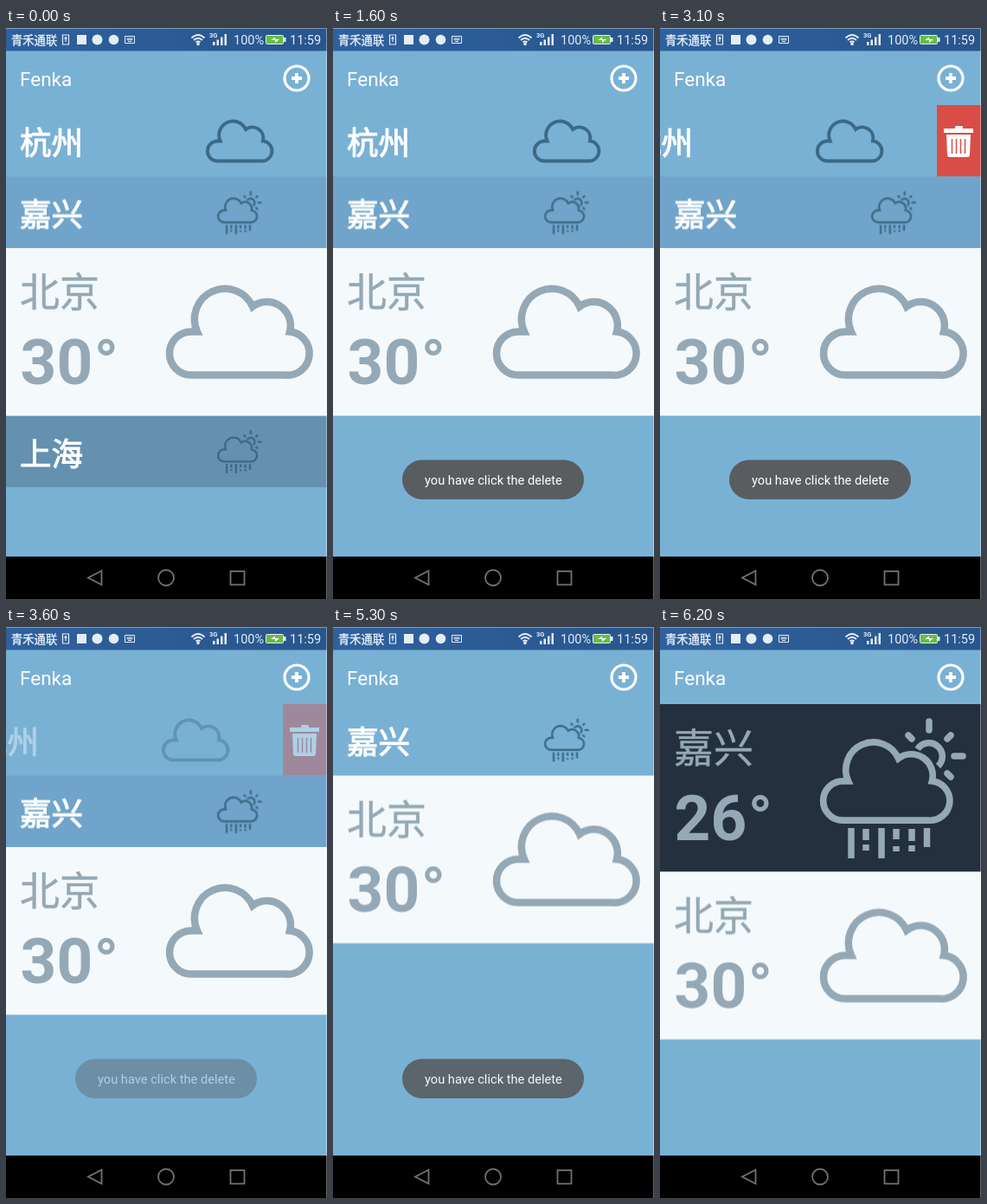
Animation of 371 by 659 pixels, one loop 6.4 s. Source, as an HTML page:

```html
<!DOCTYPE html>
<html lang="zh-CN">
<head>
<meta charset="utf-8">
<title>Weather list</title>
<style>
  html, body { margin: 0; width: 100%; height: 100%; overflow: hidden; background: #79b1d5; }
  svg { display: block; width: 100vw; height: 100vh; }
  text { font-family: Roboto, "Noto Sans CJK SC", "Noto Sans CJK", sans-serif; white-space: pre; }
  .line { fill: none; stroke: currentColor; }
  .city { font-size: 36.5px; fill: #fff; stroke: #fff; stroke-width: 1.1px; }
  .big-city { font-size: 46px; fill: currentColor; stroke: currentColor; stroke-width: .5px; }
  .degrees { font-size: 73px; font-weight: 700; fill: currentColor; }
  .small { color: #3b6a86; }
  .large { color: #95a8b5; }

  /* 1% = 64 ms; values are held for 100 ms steps */
  .anim { animation: 6400ms step-end infinite; }
  #shanghai { animation-name: drag-shanghai; }
  #hangzhou { animation-name: drag-hangzhou; }
  #jiaxing { animation-name: lift-jiaxing; }
  #jiaxing-shade { animation-name: clear-shade; }
  #jiaxing-icon { animation-name: blend-icon; }
  #jiaxing-open { animation-name: open-jiaxing; opacity: 0; }
  #beijing { animation-name: move-beijing; }
  #toast { animation-name: toast; opacity: 0; }

  @keyframes drag-shanghai {
    0% { transform: translate(0, 447.5px); opacity: 1; }
    3.125% { transform: translate(0, 447.5px); animation-timing-function: steps(6); }
    12.5% { transform: translate(-51px, 447.5px); opacity: 1; }
    18.75% { transform: translate(-51px, 447.5px); opacity: .6; }
    20.3125%, 100% { transform: translate(-51px, 447.5px); opacity: 0; }
  }
  @keyframes drag-hangzhou {
    0% { transform: translate(0, 89px); opacity: 1; }
    39.0625% { transform: translate(0, 89px); animation-timing-function: steps(6); }
    48.4375% { transform: translate(-51px, 89px); opacity: 1; }
    56.25% { transform: translate(-51px, 89px); opacity: .4; }
    57.8125%, 100% { transform: translate(-51px, 89px); opacity: 0; }
  }
  @keyframes lift-jiaxing {
    0% { transform: translateY(171.5px); opacity: 1; }
    57.8125% { transform: translateY(163.5px); }
    59.375% { transform: translateY(117.5px); }
    60.9375% { transform: translateY(89px); opacity: 1; }
    93.75% { transform: translateY(89px); opacity: .9; }
    95.3125% { transform: translateY(89px); opacity: .35; }
    96.875%, 100% { transform: translateY(89px); opacity: 0; }
  }
  @keyframes clear-shade {
    0% { opacity: 1; }
    57.8125% { opacity: .9; }
    59.375% { opacity: .4; }
    60.9375%, 100% { opacity: 0; }
  }
  @keyframes blend-icon {
    0% { opacity: 1; }
    57.8125% { opacity: .9; }
    59.375% { opacity: .77; }
    60.9375%, 100% { opacity: 1; }
  }
  @keyframes open-jiaxing {
    0% { opacity: 0; }
    93.75% { opacity: .1; }
    95.3125% { opacity: .65; }
    96.875%, 100% { opacity: 1; }
  }
  @keyframes move-beijing {
    0% { transform: translateY(254px); }
    57.8125% { transform: translateY(246px); }
    59.375% { transform: translateY(200px); }
    60.9375% { transform: translateY(171.5px); }
    93.75% { transform: translateY(182px); }
    95.3125% { transform: translateY(244.2px); }
    96.875%, 100% { transform: translateY(282.5px); }
  }
  @keyframes toast {
    0% { opacity: 0; }
    20.3125% { opacity: .1; }
    21.875% { opacity: .5; }
    23.4375% { opacity: .9; }
    25% { opacity: 1; }
    50% { opacity: .98; }
    51.5625% { opacity: .9; }
    53.125% { opacity: .5; }
    54.6875% { opacity: 0; }
    56.25% { opacity: .4; }
    57.8125% { opacity: .85; }
    59.375% { opacity: 1; }
    81.25% { opacity: .98; }
    82.8125% { opacity: .9; }
    84.375% { opacity: .45; }
    85.9375%, 100% { opacity: 0; }
  }
</style>
</head>
<body>
<svg viewBox="0 0 371 659" preserveAspectRatio="none">
  <defs>
    <linearGradient id="bar">
      <stop offset="0" stop-color="#2f619e"/>
      <stop offset="1" stop-color="#28558c"/>
    </linearGradient>
    <path id="cloud" class="line" stroke-width="8.5"
      d="M29 104a25 25 0 0 1 0-50h7A35 35 0 0 1 100 25A27.5 27.5 0 0 1 143 54A25 25 0 0 1 138 104z"/>
    <g id="rain" class="line" stroke-width="7.5">
      <use href="#cloud" transform="translate(0 24) scale(.905)"/>
      <path d="M112.700 36A15.500 15.500 0 1 1 136.500 55.500"/>
      <path d="M126 4v10M155 44h10M102 20l4 4M147 24l4-4M147 64l4 4" stroke-linecap="round"/>
      <path d="M36 127v35M53 128v13m0 5v7M71 127v35M88 128v12m0 8v6M106 128v14m0 5v7M123.500 127v22"/>
    </g>
    <g id="delete">
      <rect x="371" width="52" height="82.500" fill="#d94d46"/>
      <g fill="#fff">
        <path d="M379 27h13v-1.500q0-1.500 1.500-1.500h6q1.500 0 1.500 1.500V27h12v5h-34z"/>
        <path d="M382 34h28l-1 23q0 3-3 3h-20q-3 0-3-3z"/>
      </g>
      <path d="M388.500 39v17M393.500 39v17M398.500 39v17M403.500 39v17" stroke="#d94d46" stroke-width="1.500"/>
    </g>
  </defs>

  <rect width="371" height="659" fill="#79b1d5"/>

  <!-- list -->
  <g id="hangzhou" class="anim">
    <text class="city" x="16" y="57">杭州</text>
    <use class="small" href="#cloud" transform="translate(231 16.500) scale(.4615)"/>
    <use href="#delete"/>
  </g>
  <g id="jiaxing" class="anim">
    <rect id="jiaxing-shade" class="anim" width="371" height="82.500" fill="#70a4ca"/>
    <text class="city" x="16" y="57">嘉兴</text>
    <g id="jiaxing-icon" class="anim">
      <use class="small" href="#rain" transform="translate(244 16.500) scale(.3077)"/>
    </g>
  </g>
  <g id="shanghai" class="anim">
    <rect width="371" height="82.500" fill="#6391af"/>
    <text class="city" x="16" y="57">上海</text>
    <use class="small" href="#rain" transform="translate(244 16.500) scale(.3077)"/>
    <use href="#delete"/>
  </g>
  <g id="jiaxing-open" class="anim large">
    <g transform="translate(0 89)">
      <rect width="371" height="193.500" fill="#25303e"/>
      <text class="big-city" x="16" y="66.500">嘉兴</text>
      <text class="degrees" x="16.500" y="156.500">26<tspan dx="1.500">°</tspan></text>
      <use href="#rain" x="185" y="16"/>
    </g>
  </g>
  <g id="beijing" class="anim large">
    <rect width="371" height="193.500" fill="#f4f9fc"/>
    <text class="big-city" x="16" y="66.500">北京</text>
    <text class="degrees" x="16.500" y="156.500">30<tspan dx="1.500">°</tspan></text>
    <use href="#cloud" x="185" y="42.500"/>
  </g>

  <!-- header -->
  <text x="16" y="67" font-size="22.500" fill="#fff">Fenka</text>
  <g fill="none" stroke="#fff">
    <circle cx="336" cy="58" r="14" stroke-width="3.200"/>
    <path d="M330 58h12M336 52v12" stroke-width="3.800"/>
  </g>

  <!-- status bar -->
  <rect width="371" height="26.500" fill="url(#bar)"/>
  <g fill="#e4edf6">
    <text x="6" y="18.500" font-size="13.300" stroke="#e4edf6" stroke-width=".4">青禾通联</text>
    <rect x="82" y="8" width="11" height="11"/>
    <circle cx="105.500" cy="13.500" r="6"/>
    <circle cx="124.500" cy="13.500" r="5.800"/>
    <text x="235" y="11" font-size="7.500" font-weight="700">3G</text>
    <path d="M239 16h2.500v4H239zM243.500 13.500h2.500v6.500h-2.500zM248 10.500h2.500V20H248zM252.500 7h2.500v13h-2.500z"/>
    <text x="263" y="19" font-size="14.500">100%</text>
    <text x="328" y="19" font-size="14.500">11:59</text>
    <circle cx="222" cy="18.500" r="1.800"/>
  </g>
  <g fill="none" stroke="#e4edf6">
    <path d="M65.500 8h7v11h-7zM69 16v-5M67.500 12.500l1.500-2 1.500 2" stroke-width="1.200"/>
    <path d="M137.500 9.500h11v8h-11zM139.500 12h7M139.500 13.700h7M141 15.500h4"/>
    <path d="M214.500 11.500q7.500-7 15 0M217 14q5-4.500 10 0M219.500 16.500q2.500-2 5 0" stroke-width="1.800"/>
  </g>
  <rect x="300.500" y="8.500" width="20" height="10" rx="1" fill="#67bd45" stroke="#e4edf6"/>
  <rect x="321" y="11" width="2.500" height="5" fill="#e4edf6"/>
  <path d="M306 14l5-3.500v2.500h5l-5 4v-3z" fill="#fff"/>

  <!-- navigation -->
  <rect y="610" width="371" height="49"/>
  <g fill="none" stroke="#727272" stroke-width="1.800">
    <path d="M110.500 626.500v16l-15.500-8z"/>
    <circle cx="185" cy="634.500" r="9"/>
    <rect x="259.500" y="627" width="16" height="15.500"/>
  </g>

  <g id="toast" class="anim">
    <rect x="80" y="498.500" width="210" height="45.500" rx="22.750" fill="#595d60"/>
    <text x="106" y="527" font-size="14.650" fill="#fff">you have click the delete</text>
  </g>

  <!-- pale screen edge -->
  <path d="M0 .500h370.500v658.500" fill="none" stroke="#fff" stroke-opacity=".4"/>
</svg>
</body>
</html>
```
